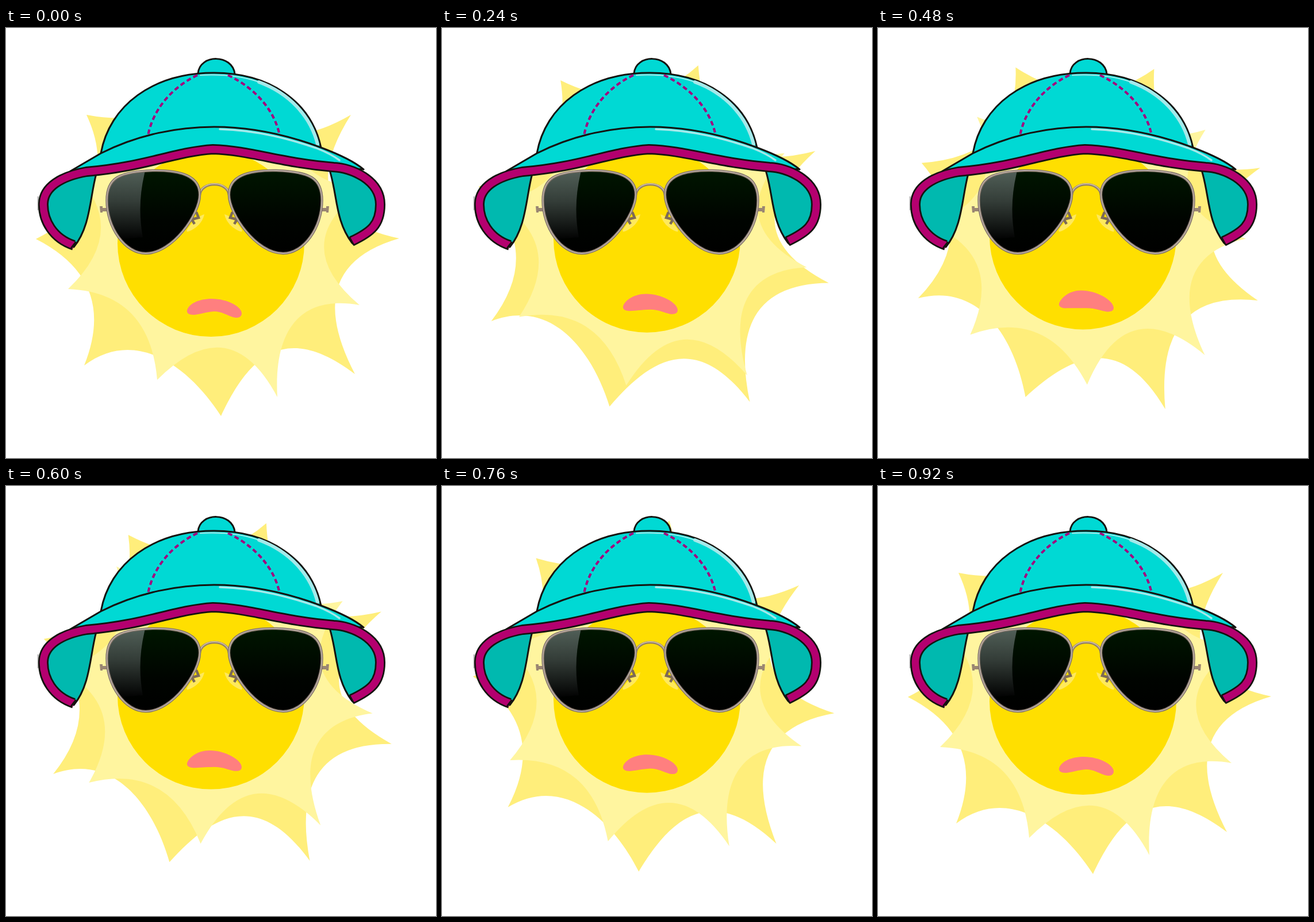
An HTML page that plays this animation: 748 by 748 pixels, repeating every 960 ms.

```html
<!DOCTYPE html>
<html lang="en">
<head>
<meta charset="utf-8">
<title>Sun in a hat</title>
<style>
  html, body { margin: 0; width: 100%; height: 100%; overflow: hidden; background: #fff; }
  svg { display: block; width: 100vw; height: 100vh; }
  .line { fill: none; stroke: #14130f; stroke-width: 3; stroke-linecap: round; stroke-linejoin: round; }
  .cloth { fill: #00d9d4; }
  .shine { fill: none; stroke: #a5e9ea; stroke-linecap: round; }
  .stitch { fill: none; stroke: #a3007e; stroke-width: 4; stroke-dasharray: 8 5; }
</style>
</head>
<body>
<svg viewBox="0 0 748 748">
  <defs>
    <linearGradient id="glass" x1="0" y1="0" x2="0" y2="1">
      <stop offset="0" stop-color="#001600"/>
      <stop offset=".6" stop-color="#000400"/>
      <stop offset="1" stop-color="#000"/>
    </linearGradient>
    <linearGradient id="gloss" x1="0" y1="0" x2="0" y2="1">
      <stop offset="0" stop-color="#53625a"/>
      <stop offset=".45" stop-color="#343d38"/>
      <stop offset="1" stop-color="#000"/>
    </linearGradient>
    <path id="lensShape" d="M175.5 300C175.5 262 195 250 255 248C305 247 337 258 337 290C337 323 290 392 243 392C207 392 175.5 347 175.5 300Z"/>
    <clipPath id="lensClip"><use href="#lensShape"/></clipPath>
    <path id="band" d="M118 378C82 366 64 335 65 305C66 277 95 258 140 250C240 242 295 215 360 211C425 213 480 235 570 242C600 243 651 264 651 307C651 342 635 355 601 371"/>
    <g id="fittings">
      <path d="M345 324C338 326 330 332 322 341C314 350 312 355 317 354C329 350 342 339 345 324Z" fill="#ffe95c"/>
      <path d="M331 320L335 330L323 333L328 341" fill="none" stroke="#7d6a55" stroke-width="4.5"/>
      <path d="M163 310H168V313H176V319H168V321H164Z" fill="#9a8672"/>
    </g>
    <g id="rim" fill="none">
      <use href="#lensShape" stroke="#7f7167" stroke-width="4.5"/>
      <use href="#lensShape" stroke="#bcaea4" stroke-width="1.8"/>
    </g>
  </defs>

  <g id="sun">
    <path id="outer" fill="#ffee7b" d="M140 151Q290 180 364 62Q430 250 600 151Q490 325 684 366Q510 416 607 602C481 506 419 579 374 675C318 588 225 520 136 587Q195 440 52 367Q205 290 140 151Z"/>
    <path id="inner" fill="#fff59f" d="M108 454Q250 460 263 612Q389 486 472 642C465 515 520 465 615 482Q488 375 622 280Q478 267 483 118Q372 217 263 108Q267 256 118 251Q217 351 108 454Z"/>
    <circle cx="356.5" cy="374.5" r="162.5" fill="#ffdf00"/>
    <path id="mouth" fill="#ff7f7f"/>
  </g>

  <g id="hat">
    <rect x="54.5" y="293" width="2.5" height="24" fill="#bbb"/>
    <path fill="#00b9af" d="M158 250C146 290 148 345 120 376C80 366 68 335 68 305C70 270 110 254 158 250Z"/>
    <path fill="#00b9af" d="M562 244C577 290 572 335 600 372C640 355 650 335 650 305C645 275 615 248 562 244Z"/>
    <path class="line" d="M158 250C146 290 148 345 118 381M562 244C577 290 572 335 602 374"/>
    <path class="line cloth" d="M334 79C337 45 394 45 398 80"/>
    <path class="line cloth" d="M165 218C180 135 255 78 362 78C455 78 530 125 548 208L362 205Z"/>
    <path class="shine" stroke-width="6" d="M440 94C492 113 530 153 542 202"/>
    <path class="shine" stroke-width="2" d="M338 82C380 80 415 85 440 94"/>
    <path class="stitch" d="M333 82C285 105 255 145 247 187M386 82C435 105 468 145 476 187"/>
    <path class="line cloth" d="M112 249L165 218C230 185 300 172 362 172C430 172 495 188 548 208C588 223 608 234 622 246L570 242C480 235 425 213 360 211C295 215 240 242 140 250Z"/>
    <path class="shine" stroke-width="3.5" d="M372 176C440 178 495 194 540 209C560 217 572 224 580 230"/>
    <use href="#band" fill="none" stroke="#14130f" stroke-width="18"/>
    <use href="#band" fill="none" stroke="#b4006f" stroke-width="12.5"/>
    <path class="line" d="M114 382L121 373M598 365L604 376"/>
  </g>

  <g id="glasses">
    <use href="#fittings"/>
    <use href="#fittings" transform="matrix(-1 0 0 1 725 0)"/>
    <path d="M337 290C340 266 385 266 388 290" fill="none" stroke="#917e69" stroke-width="4.5"/>
    <path d="M337 289C340 265 385 265 388 289" fill="none" stroke="#cbb9a0" stroke-width="1.8"/>
    <use href="#lensShape" fill="url(#glass)"/>
    <path clip-path="url(#lensClip)" fill="url(#gloss)" d="M170 245H243Q227 305 238 364L170 370Z"/>
    <use href="#rim"/>
    <g transform="matrix(-1 0 0 1 725 0)">
      <use href="#lensShape" fill="url(#glass)"/>
      <use href="#rim"/>
    </g>
  </g>
</svg>
<script>
  const STEP = 40, LOOP = 960, PEAK = 11, LAST = 23;
  const TURN = 22.8, LIFT = 12.8;
  const FROWN = 'M315 491C318 480 335 471 358 471C385 471 411 485 410 497C409 504 403 505 395 503C385 500 375 493 362 493C348 494 338 498 327 499C318 499 314 496 315 491Z';
  const POUT = 'M315 492C318 482 333 469 353 469C380 469 409 486 410 499C410 505 405 506 398 506C388 505 380 500 362 500C345 500 335 500 326 500C318 500 314 496 315 492Z';
  const poutNums = POUT.match(/\d+/g).map(Number);

  const $ = id => document.getElementById(id);
  const sun = $('sun'), outer = $('outer'), inner = $('inner'), mouth = $('mouth');

  const smooth = s => s * s * (3 - 2 * s);
  const settle = s => s + s * s - s * s * s;   // steady start, soft end

  const morph = k => {
    let i = 0;
    return FROWN.replace(/\d+/g, v => (+v + (poutNums[i++] - v) * k).toFixed(2));
  };
  const spin = (el, deg) => el.setAttribute('transform', `rotate(${deg} 367 367.4)`);

  function draw(now) {
    const n = Math.floor((now % LOOP) / STEP);
    const rising = n <= PEAK;
    const s = rising ? n / PEAK : (LAST - n) / (LAST - PEAK);
    const k = smooth(s);
    spin(outer, TURN * (rising ? settle(s) : k));
    spin(inner, -TURN * k);
    sun.setAttribute('transform', `translate(0 ${-LIFT * k})`);
    mouth.setAttribute('d', morph(k));
  }

  const start = performance.now();
  function tick() {
    draw(performance.now() - start);
    requestAnimationFrame(tick);
  }
  tick();
</script>
</body>
</html>
```
